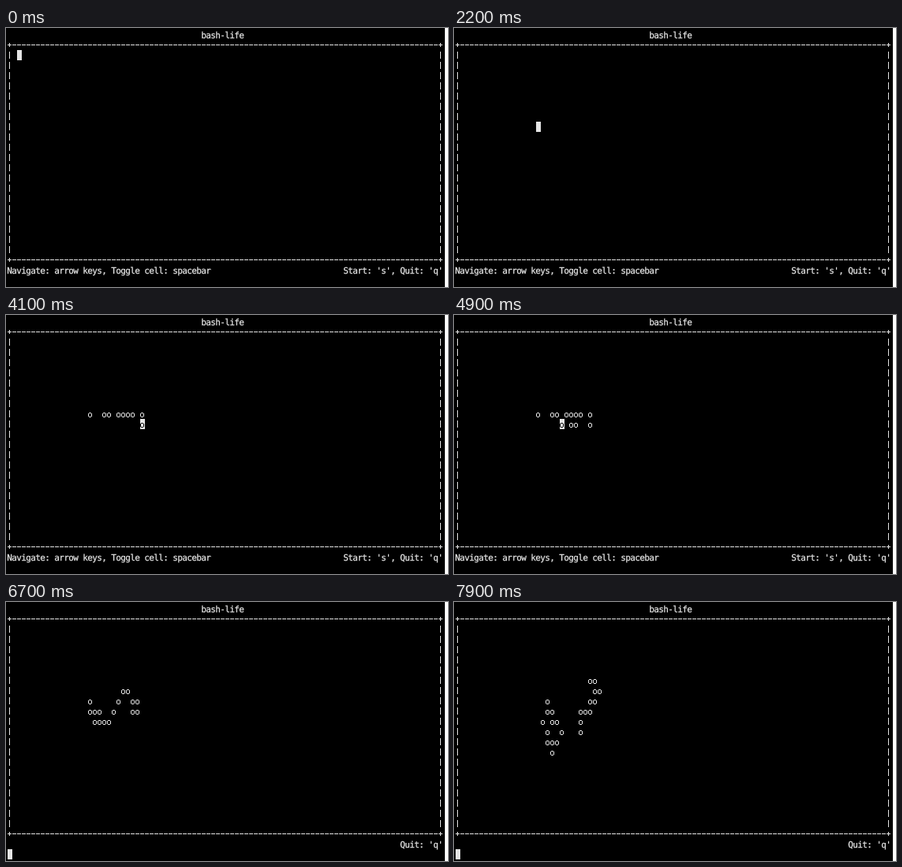
An HTML page that plays this animation: 560 by 329 pixels, repeating every 8000 ms.

```html
<!DOCTYPE html>
<html lang="en">
<head>
<meta charset="utf-8">
<title>bash-life</title>
<style>
  html, body { margin: 0; width: 560px; height: 329px; overflow: hidden; background: #fff; }
  svg { display: block; fill: #e5e5e5; }
  text {
    font: 11px "DejaVu Sans Mono", monospace;
    letter-spacing: -0.622px;
    text-rendering: geometricPrecision;
    white-space: pre;
    stroke: #e5e5e5;
    stroke-width: 0.25px;
  }
</style>
</head>
<body>
<svg width="560" height="329" viewBox="0 0 560 329">
  <rect width="556" height="329" fill="#000"/>
  <text x="247.2" y="13">bash-life</text>
  <text id="navigate" x="1.2" y="312">Navigate: arrow keys, Toggle cell: spacebar</text>
  <text id="start" x="427.2" y="312">Start: 's',</text>
  <text x="499.2" y="312">Quit: 'q'</text>
  <path id="frame" shape-rendering="crispEdges"/>
  <path id="cells" shape-rendering="crispEdges"/>
  <rect id="cursor" width="6" height="13" shape-rendering="crispEdges"/>
  <path id="covered" fill="#000" shape-rendering="crispEdges"/>
</svg>
<script>
const LOOP = 8000, COLS = 92, BOTTOM = 22, PROMPT_ROW = 24;
const el = id => document.getElementById(id);
const left = col => 2 + 6 * col;
const top_ = row => 2 + 13 * row;
const box = (x, y, w, h) => `M${x} ${y}h${w}v${h}h${-w}z`;

// Key presses by time: R/L/D move the cursor, T toggles a cell, N runs a generation.
const keys = `
  100R 200R 300R 500RR 600R 800RR 1000RD
  1200DD 1300D 1400D 1500D 1600D 1700R 1800R 2000RR
  2200RR 2300T 2400R 2500R 2600R 2700T 2800R 2900T 3000R
  3100R 3200TR 3400TR 3500TR 3600T 3700RR 3800T 3900D
  4100T 4200L 4300LL
  4500TL 4600T 4700L 4800L 4900T 5000L 5100T 5200L 5300TL
  5400T 5500L 5600TL 5700T
  6700N 6800N 6900N 7000N 7200NN 7400NN 7600NN 7700N 7900N`
  .trim().split(/\s+/)
  .map(s => ({ time: parseInt(s, 10), moves: s.replace(/\d+/, "") }));

function nextGeneration(live) {
  const counts = new Map();
  for (const cell of live)
    for (const dy of [-COLS, 0, COLS])
      for (const dx of [-1, 0, 1])
        counts.set(cell + dy + dx, (counts.get(cell + dy + dx) || 0) + 1);
  // Counts include the cell itself.
  return new Set([...counts]
    .filter(([cell, n]) => n === 3 || (n === 4 && live.has(cell)))
    .map(([cell]) => cell));
}

function press(state, key) {
  const cell = state.row * COLS + state.col;
  if (key === "R") state.col++;
  if (key === "L") state.col--;
  if (key === "D") state.row++;
  if (key === "T" && !state.live.delete(cell)) state.live.add(cell);
  if (key === "N") {
    state.live = nextGeneration(state.live);
    state.running = true;
    state.col = 0;
    state.row = PROMPT_ROW;
  }
}

const states = [{ time: 0, col: 2, row: 2, live: new Set(), running: false }];
for (const { time, moves } of keys) {
  const last = states[states.length - 1];
  const state = { ...last, time, live: new Set(last.live) };
  for (const key of moves) press(state, key);
  states.push(state);
}

function cellPath(cell) {
  const x = left(cell % COLS), y = top_(Math.floor(cell / COLS));
  return box(x + 1, y + 5, 3, 1) + box(x, y + 6, 1, 4) +
         box(x + 4, y + 6, 1, 4) + box(x + 1, y + 10, 3, 1);
}

function framePath() {
  let d = "";
  for (const row of [1, BOTTOM]) {
    for (let col = 0; col < COLS; col++) d += box(left(col), top_(row) + 6, 5, 1);
    for (const col of [0, COLS - 1]) d += box(left(col) + 2, top_(row) + 4, 1, 5);
  }
  for (let row = 2; row < BOTTOM; row++)
    for (const col of [0, COLS - 1]) d += box(left(col) + 2, top_(row) + 2, 1, 9);
  return d;
}

function draw({ col, row, live, running }) {
  const under = row * COLS + col;
  el("cells").setAttribute("d", [...live].map(cellPath).join(""));
  el("cursor").setAttribute("x", left(col));
  el("cursor").setAttribute("y", top_(row));
  el("covered").setAttribute("d", live.has(under) ? cellPath(under) : "");
  for (const id of ["navigate", "start"])
    el(id).setAttribute("visibility", running ? "hidden" : "visible");
}

let shown;
const origin = performance.now();
function tick() {
  const t = (performance.now() - origin) % LOOP;
  const state = states.filter(s => s.time <= t).pop();
  if (state !== shown) draw(shown = state);
  requestAnimationFrame(tick);
}

el("frame").setAttribute("d", framePath());
tick();
</script>
</body>
</html>
```
